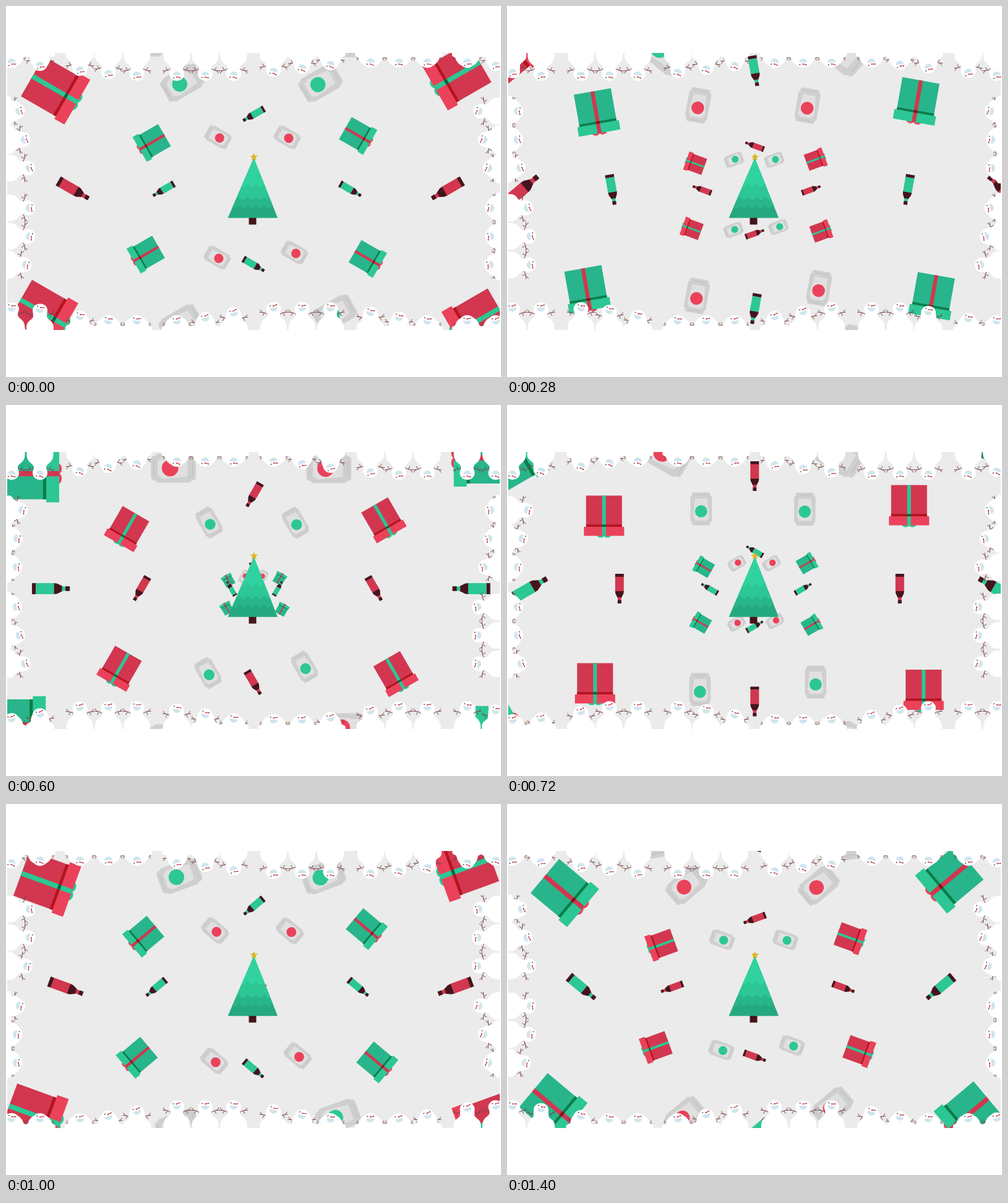
An HTML page with a canvas for the animation above (1.44 s loop, 800 by 600 pixels).

```html
<!DOCTYPE html>
<html lang="en">
<head>
<meta charset="utf-8">
<title>Christmas burst</title>
<style>
  html, body { margin: 0; width: 100%; height: 100%; overflow: hidden; background: #fff; }
  canvas { display: block; }
</style>
</head>
<body>
<canvas id="stage" width="800" height="600"></canvas>
<script>
const ctx = document.getElementById('stage').getContext('2d');
const LOOP = 1440, STEP = 40, SPAWN = 480, TAU = Math.PI * 2;
const WOOD = '#45141c';
const RED = { body: '#d2374f', light: '#ea425a', dark: '#b3141f', ribbon: '#d2374f', shade: '#7d1420' };
const GREEN = { body: '#28b58b', light: '#2cc795', dark: '#0b7d48', ribbon: '#2cc795', shade: '#0b6040' };

function rect(color, x, y, w, h) {
  ctx.fillStyle = color;
  ctx.fillRect(x, y, w, h);
}

function poly(color, points) {
  ctx.fillStyle = color;
  ctx.beginPath();
  points.forEach(([x, y]) => ctx.lineTo(x, y));
  ctx.fill();
}

function oval(color, x, y, rx, ry = rx, from = 0, to = TAU) {
  ctx.fillStyle = color;
  ctx.beginPath();
  ctx.ellipse(x, y, rx, ry, 0, from, to);
  ctx.fill();
}

function drawBox(main, accent) {
  oval(accent.light, -5.5, 34.5, 6, 4);
  oval(accent.light, 5.5, 34.5, 6, 4);
  rect(main.body, -29, -29.5, 58, 52);
  rect(main.dark, -29, 17.3, 58, 4);
  rect(main.light, -32.5, 21, 65, 14.6);
  rect(accent.ribbon, -3, -29.5, 6, 65);
  rect(accent.shade, -3, 17.3, 6, 3.8);
}

function drawBottle(main) {
  const glass = main.ribbon;
  rect(WOOD, -7, -24, 14, 5);
  rect(glass, -7, -19.2, 14, 23.4);
  poly(WOOD, [[-7, 4], [7, 4], [6.5, 8], [3, 15], [-3, 15], [-6.5, 8]]);
  poly(glass, [[-3, 14], [3, 14], [2.6, 19], [-2.6, 19]]);
  rect(WOOD, -3, 18.5, 6, 5.5);
}

function drawCan(main, accent) {
  ctx.fillStyle = '#cfcfcf';
  ctx.beginPath();
  ctx.roundRect(-15, -27, 30, 54, 4);
  ctx.roundRect(-17.5, -22, 35, 44, 4);
  ctx.fill();
  rect('#c2c2c2', -10, -23.5, 20, 1);
  rect('#c2c2c2', -10, 23, 20, 1);
  poly('#e0e0e0', [[-10, -17], [10, -17], [13, 13], [9, 19], [-9, 19], [-13, 13]]);
  oval(accent.light, 0, 4, 10);
}

// painter, centre y, scale at birth, scale gained
const kinds = {
  box: [drawBox, 306, 0.14, 0.86],
  bottle: [drawBottle, 297, 0.45, 0.55],
  can: [drawCan, 300, 0.29, 0.7]
};
// kind, travel x, travel y, spin direction
const items = [
  ['box', -243.5, -130, -1], ['box', 249.5, -147, 1],
  ['box', -258, 141, -1], ['box', 273, 151.5, 1],
  ['can', -86.5, -132, 1], ['can', 81, -131.5, 1],
  ['can', -88.5, 160, 1], ['can', 98.5, 148, 1],
  ['bottle', -218.5, 0, -1], ['bottle', 234.5, 0, 1],
  ['bottle', 0, -182, -1], ['bottle', 0, 182.5, 1]
];

function drawGeneration(age, main, accent) {
  const u = age / 720;
  for (const [kind, dx, dy, spin] of items) {
    const [draw, centreY, birth, gain] = kinds[kind];
    const scale = birth + gain * u;
    ctx.save();
    ctx.translate(400.3 + dx * u, centreY + dy * u);
    ctx.rotate(spin * (age - 720) / LOOP * TAU);
    ctx.scale(scale, scale);
    draw(main, accent);
    ctx.restore();
  }
}

function drawTree() {
  rect(WOOD, 392.5, 341, 12, 12.5);
  ctx.save();
  ctx.beginPath();
  [[400.5, 246], [439, 342.7], [358.5, 342.7]].forEach(p => ctx.lineTo(...p));
  ctx.clip();
  rect('#25a980', 350, 240, 100, 110);
  for (const [color, y] of [['#28b58a', 325], ['#2cc795', 311], ['#30d3a0', 290]]) {
    const edge = [[450, 240], [350, 240]];
    for (let i = 0; i <= 15; i++) edge.push([350 + i * 6.7, y + (i % 2 ? 3 : -2.5)]);
    poly(color, edge);
  }
  ctx.restore();
  const star = [];
  for (let i = 0; i < 10; i++) {
    const r = i % 2 ? 2.9 : 6.6, a = i * TAU / 10;
    star.push([400.7 + r * Math.sin(a), 244.3 - r * Math.cos(a)]);
  }
  poly('#dfb522', star);
}

// Local y points from the edge into the scene; the body widens as it sinks.
function drawSnowman(depth, tilt) {
  const base = 27 - 0.15 * depth;
  const waist = 10 + 0.45 * (36 - depth), waistY = Math.max(depth - 12, 8);
  ctx.strokeStyle = '#78424a';
  ctx.lineWidth = 1;
  ctx.beginPath();
  for (const s of [-1, 1]) {
    ctx.moveTo(s * 9, depth - 11);
    ctx.lineTo(s * 15, depth - 8);
    ctx.lineTo(s * 23, depth - 7);
    ctx.moveTo(s * 15, depth - 8);
    ctx.lineTo(s * 18, depth - 13);
    ctx.moveTo(s * 18, depth - 8);
    ctx.lineTo(s * 22, depth - 3);
  }
  ctx.stroke();
  ctx.fillStyle = '#fff';
  ctx.beginPath();
  ctx.moveTo(-base, -4);
  ctx.lineTo(-base, 3);
  ctx.bezierCurveTo(-base, waistY * 0.75, -waist - 2, waistY * 0.7, -waist, waistY);
  ctx.bezierCurveTo(-14, depth + 12, 14, depth + 12, waist, waistY);
  ctx.bezierCurveTo(waist + 2, waistY * 0.7, base, waistY * 0.75, base, 3);
  ctx.lineTo(base, -4);
  ctx.fill();
  oval('#fff', 0, depth - 2, 12, 11);
  ctx.translate(0, depth);
  ctx.rotate(tilt);
  oval('#d0e5ee', 0, 0, 6.5, 6, Math.PI, TAU);
  oval('#333', -5, 4, 0.9);
  oval('#333', 5, 4, 0.9);
  poly('#d2374f', [[-1, 1.8], [8, 4], [-1, 3.8]]);
}

// x, y, angle, facing, snowmen, first offset, place in trio, peak time, delay per pixel
const edges = [
  [2, 76, 0, 1, 16, -39, 1, 552, -1.95],
  [2, 76, TAU / 4, -1, 6, 94, 0, 700, 3],
  [2, 524, 0, -1, 16, -39, 1, 75, 2.85],
  [798, 76, TAU / 4, 1, 6, 94, 0, 1480, -2.8]
];

function drawSnowmen(time) {
  for (const [x, y, angle, facing, count, first, member, peak, delay] of edges) {
    for (let n = member; n < member + count; n++) {
      const along = first + Math.floor(n / 3) * 156.5 + (n % 3) * 46;
      const wave = (time - peak - delay * along) / LOOP * TAU;
      const rise = Math.max(-1, Math.min(1, 1.4 * Math.cos(wave)));
      ctx.save();
      ctx.translate(x, y);
      ctx.rotate(angle);
      ctx.translate(along, 0);
      ctx.scale(1, facing);
      drawSnowman(25.5 + 10.5 * rise, 0.28 * Math.sin(wave));
      ctx.restore();
    }
  }
}

function render(time) {
  rect('#fff', 0, 0, 800, 600);
  ctx.save();
  ctx.beginPath();
  ctx.rect(2, 76, 796, 448);
  ctx.clip();
  rect('#ebebeb', 0, 76, 800, 448);
  const cycle = Math.floor(time / SPAWN);
  for (let k = 3; k >= 0; k--) {
    const colors = (k + cycle) % 2 ? [GREEN, RED] : [RED, GREEN];
    drawGeneration(time % SPAWN + k * SPAWN, ...colors);
  }
  drawTree();
  drawSnowmen(time);
  ctx.restore();
}

const begin = performance.now();
function frame() {
  const elapsed = (performance.now() - begin) % LOOP;
  render(Math.floor(elapsed / STEP) * STEP);
  requestAnimationFrame(frame);
}
frame();
</script>
</body>
</html>
```
